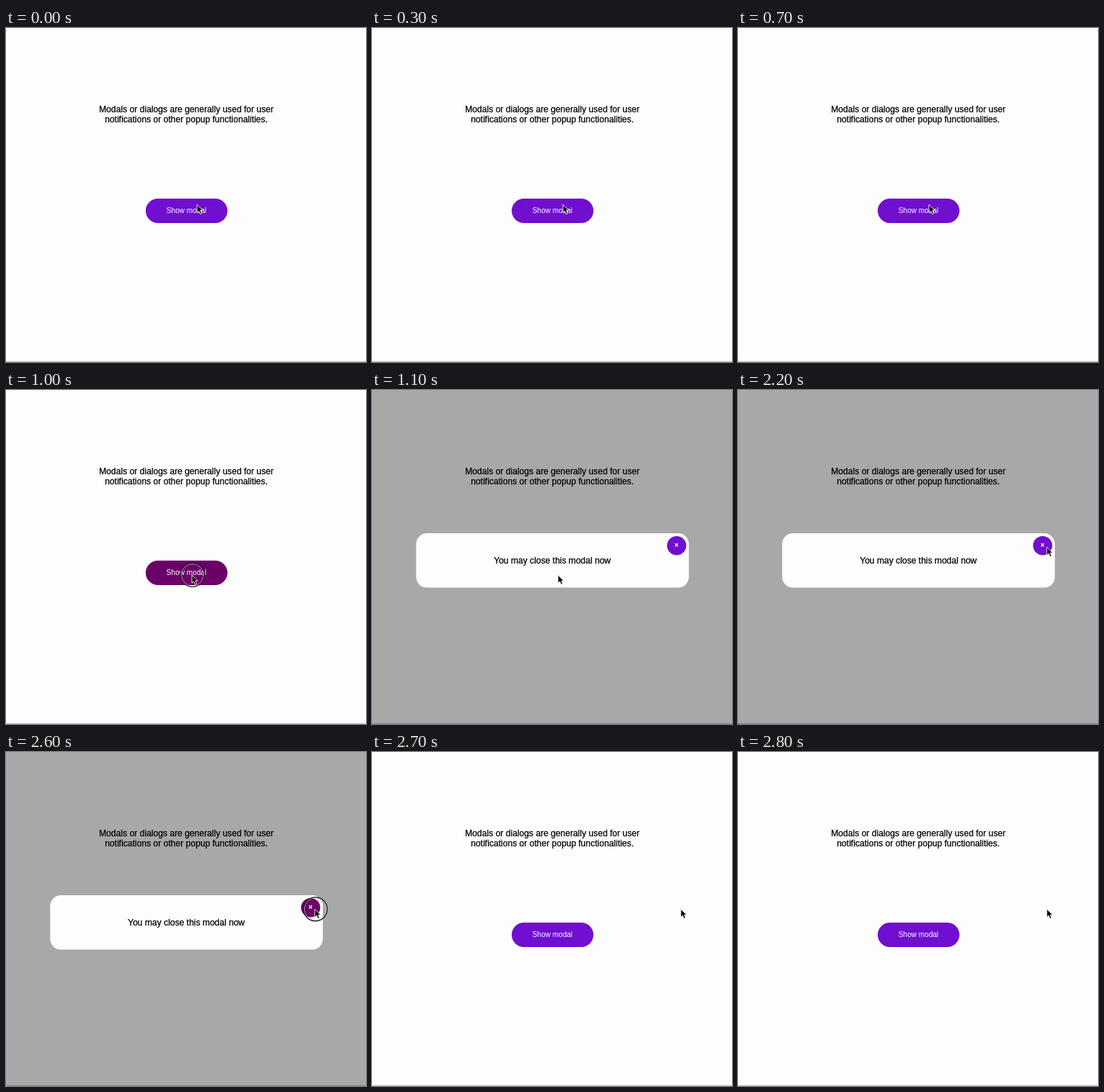
These frames come from a looping animation (500x464 px, 3100 ms). An HTML page:

```html
<!DOCTYPE html>
<html lang="en">
<head>
<meta charset="utf-8">
<title>Modal demo</title>
<style>
  html, body { margin: 0; width: 100%; height: 100%; overflow: hidden; background: #fdfdfd; }
  svg { display: block; width: 100%; height: 100%; }
  text { font-family: "Liberation Sans", Arial, sans-serif; font-size: 12.12px; text-anchor: middle; }
  .copy { stroke: #000; stroke-width: .25px; }
  .label { font-size: 10.1px; fill: #fff; }
  .close { font-size: 10px; font-weight: bold; fill: #fff; }
</style>
</head>
<body>
<svg viewBox="0 0 500 464">
  <rect id="page" width="500" height="464"/>
  <rect id="edge" y="463" width="500" height="1"/>
  <text class="copy" x="250.4" y="117.2">Modals or dialogs are generally used for user</text>
  <text class="copy" x="250.4" y="131">notifications or other popup functionalities.</text>

  <g id="opener">
    <rect id="openBtn" x="194" y="237" width="113.6" height="34" rx="17"/>
    <text class="label" x="250.6" y="257.4">Show modal</text>
  </g>

  <g id="modal">
    <rect x="61.3" y="199" width="378.8" height="75.6" rx="15" fill="#fdfdfd"/>
    <text class="copy" x="250.4" y="241">You may close this modal now</text>
    <circle id="closeBtn" cx="423.1" cy="216.2" r="13.3"/>
    <text class="close" x="423" y="219.4">×</text>
  </g>

  <g id="pointer">
    <g id="ring" fill="none">
      <circle r="15.5" stroke="#c9c9c0" stroke-width=".8"/>
      <circle r="16.5" stroke="#111" stroke-width="1.2"/>
    </g>
    <path d="M-.8 0V11.2L1.8 8.9L3.7 13.2L5.8 12.3L4 8.1H7.4Z"
      fill="#000" stroke="#fdfdfd" stroke-width=".9" stroke-linejoin="round"/>
  </g>
</svg>
<script>
const LOOP = 3100, STEP = 100;
const PURPLE = '#700fcf', PRESSED = '#6b0069';
const el = id => document.getElementById(id);
const within = (t, a, b) => t >= a && t < b;
const progress = (t, a, b) => Math.min(1, Math.max(0, (t - a) / (b - a)));
const ease = p => p * p * (3 - 2 * p);
const mix = (a, b, p) => a + (b - a) * p;
const show = (id, on) => el(id).setAttribute('visibility', on ? 'visible' : 'hidden');
const fill = (id, color) => el(id).setAttribute('fill', color);

function pointerAt(t) {
  if (t < 1500) {
    const p = ease(progress(t, 700, 900));
    return [mix(266, 259, p), mix(245.3, 257, p)];
  }
  // The pointer rises first, then glides right.
  const p = ease(progress(t, 1500, 2100));
  return [mix(258, 429.7, p), mix(257, 218.3, 1 - (1 - p) ** 3)];
}

function draw(time) {
  const t = Math.floor(time % LOOP / STEP) * STEP;
  const open = within(t, 1100, 2700);
  const pressOpen = within(t, 900, 1100);
  const pressClose = within(t, 2500, 2700);

  fill('page', open ? '#a8a8a8' : '#fdfdfd');
  fill('edge', open ? '#808080' : '#b4b4b4');
  fill('openBtn', pressOpen ? PRESSED : PURPLE);
  fill('closeBtn', pressClose ? PRESSED : PURPLE);
  show('opener', !open);
  show('modal', open);
  show('ring', pressOpen || pressClose);
  el('pointer').setAttribute('transform', `translate(${pointerAt(t)})`);
}

const start = performance.now();
function tick() {
  draw(performance.now() - start);
  requestAnimationFrame(tick);
}
tick();
</script>
</body>
</html>
```
